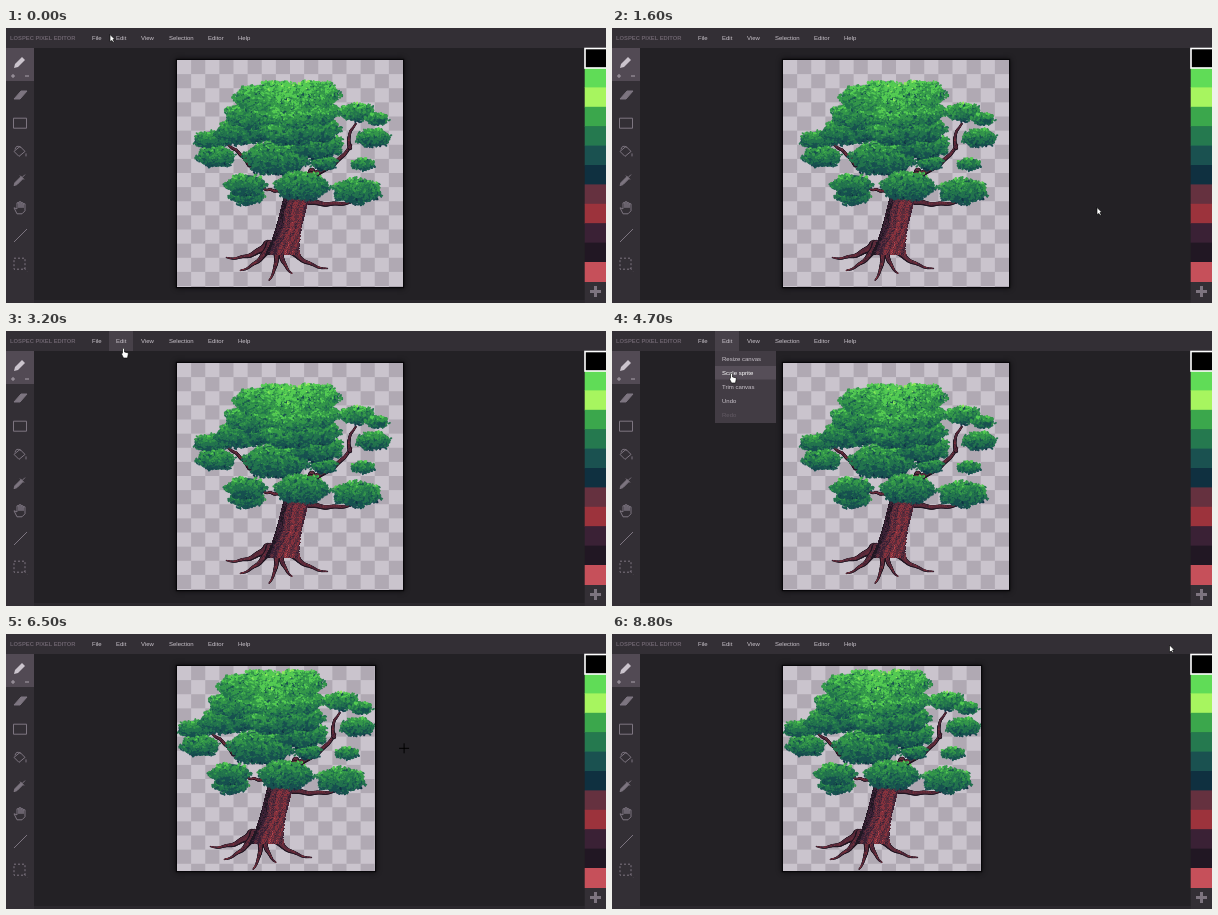
An HTML page with a canvas that plays this animation: 600x275 px, repeating every 8.9 s.

```html
<!DOCTYPE html>
<html lang="en">
<head>
<meta charset="utf-8">
<title>Pixel editor: trim canvas</title>
<style>
html, body { margin: 0; width: 100%; height: 100%; overflow: hidden; background: #232125; }
#stage { position: absolute; left: 0; top: 0; width: 600px; height: 275px; overflow: hidden; }
svg { position: absolute; left: 0; top: 0; }
canvas { position: absolute; left: 171px; top: 32px; box-shadow: 0 0 1px 1px #08070a, 0 0 5px 1px #0b0a0c; }
text { font: 6px "Liberation Sans", Arial, sans-serif; fill: #c9c3cb; }
.title { font-weight: bold; font-size: 5.8px; fill: #6b626d; }
.disabled { fill: #625a64; }
.hover { fill: #fff; }
.icon { fill: none; stroke: #7d7580; stroke-linejoin: round; }
.icon.solid { fill: #7d7580; }
.pointer { fill: #fff; stroke: #000; stroke-width: .6; }
</style>
</head>
<body>
<div id="stage">
  <canvas id="sprite"></canvas>
  <svg id="ui" width="600" height="275" viewBox="0 0 600 275"></svg>
</div>
<script>
const LOOP = 8900, STEP = 100;
const HOVER_EDIT = 3100, MENU_OPEN = 4100, TRIM = 5300;
const ROW_TOP = 21, ROW = 14;
const $ = id => document.getElementById(id);

// ---------- interface ----------
const rect = (x, y, w, h, fill, more = '') =>
  `<rect x="${x}" y="${y}" width="${w}" height="${h}" fill="${fill}" ${more}/>`;
const label = (x, y, text, cls = '') => `<text x="${x}" y="${y}" class="${cls}">${text}</text>`;

const menus = { File: 86, Edit: 110, View: 135, Selection: 163, Editor: 202, Help: 232 };
const editItems = ['Resize canvas', 'Scale sprite', 'Trim canvas', 'Undo', 'Redo'];
const swatches = ['#60dc57', '#a7f55f', '#3ba74c', '#25794f', '#1a5150', '#0f3040',
                  '#65313f', '#9c333c', '#3a2135', '#211723', '#c6505a'];

// Each icon is drawn around its own centre.
const tools = {
  eraser: 'M-6 4L1-4H7L0 4Z',
  rectangle: 'M-6.5-5h13v10h-13z',
  bucket: 'M-6 0L0-5 5 0-1 5ZM-5-2Q-4-7 1-4M6 2v3',
  eyedropper: 'M-6 6L-5 3 1-3 3-1-3 5ZM0-4L4 0M2-2L5-5',
  hand: 'M-3 6L-6 0l3 1V-5h2V0-6h2V0-5h2V0-4h2V3L2 6Z',
  line: 'M-6 6L7-7',
  select: 'M-6-6H5V5H-6ZM4 4l3 3'
};
const filled = ['eraser', 'eyedropper'];

function toolIcon(name, i) {
  const dash = name === 'select' ? 'stroke-dasharray="2"' : '';
  return `<path class="icon ${filled.includes(name) ? 'solid' : ''}" d="${tools[name]}" ${dash}
    transform="translate(14 ${67 + i * 28.2})"/>`;
}

$('ui').innerHTML =
  rect(0, 0, 600, 20, '#332f35') + rect(0, 20, 28, 255, '#332f35') +
  rect(28, 272, 551, 3, '#2b282d') + rect(0, 20, 28, 33, '#524a54') +
  rect(103, 0, 24, 20, '#474149', 'id="tab"') +
  label(4, 12.2, 'LOSPEC PIXEL EDITOR', 'title') +
  Object.entries(menus).map(([name, x]) => label(x, 12, name)).join('') +
  '<path d="M8 40l1-4 7-7 3 3-7 7z" fill="#cbc4cd"/>' +
  '<path d="M5 48h4m-2-2v4M19 48h4" stroke="#a9a1ab"/>' +
  Object.keys(tools).map(toolIcon).join('') +
  swatches.map((color, i) => rect(578.7, 40 + i * 19.4, 22, 20, color)).join('') +
  rect(579, 20.5, 22, 19.5, '#000', 'stroke="#fff" stroke-width="1.6"') +
  rect(578.7, 254, 22, 21, '#332f35') +
  '<path d="M584 263.5h11m-5.5-5.5v11" stroke="#7d747f" stroke-width="3"/>' +
  `<g id="menu">${rect(103, 20, 61, 72, '#423c44')}${rect(103, 0, 61, 13.5, '#564e58', 'id="row"')}` +
  editItems.map((s, i) => label(110, 30 + i * ROW, s, s === 'Redo' ? 'disabled' : 'item')).join('') +
  `</g><g id="cursor">
    <path id="arrow" class="pointer" d="M0 0V7L2 6 3 8 4 7 3 5H5Z"/>
    <path id="hand" class="pointer" d="M-1 1Q0-1 1 1V4L5 5 4 10H0L-2 6-1 5Z"/>
    <path id="cross" d="M-5 0H5M0-5V5" stroke="#000"/>
  </g>`;

// ---------- tree ----------
let seed = 7;
const rnd = () => (seed = (seed * 16807) % 2147483647) / 2147483647;
const jitter = size => (rnd() - .5) * size;
const lerp = (a, b, k) => a + (b - a) * k;
const pick = (colors, v) => colors[Math.max(0, Math.min(colors.length - 1, Math.floor(v)))];
const greens = ['#0f3143', '#185150', '#24754e', '#35984b', '#55cc53', '#90ec5c'];
const barks = ['#211723', '#3a2135', '#5c2c3b', '#87323d', '#b2464f'];

const FULL = { w: 226, h: 227, dx: 0, dy: 0 };
const TRIMMED = { w: 198, h: 205, dx: -16, dy: -17 };
const tree = document.createElement('canvas');
tree.width = FULL.w;
tree.height = FULL.h;
const ink = tree.getContext('2d');
ink.translate(-171, -32);

function blob(x, y, rx, ry, color, angle = 0) {
  ink.fillStyle = color;
  ink.beginPath();
  ink.ellipse(x, y, rx, ry, angle, 0, 7);
  ink.fill();
}

// A bent, tapering stroke with a dark rim and speckled light on top.
function limb(x0, y0, x1, y1, width, bend, taper = .4) {
  const dx = x1 - x0, dy = y1 - y0;
  for (const layer of ['rim', 'wood', 'light'])
    for (let k = 0; k <= 1; k += .015) {
      const arc = 2 * k * (1 - k) * bend;
      const x = x0 + dx * k - dy * arc, y = y0 + dy * k + dx * arc + Math.sin(k * 17) * .5;
      const r = width / 2 * lerp(1, taper, Math.sqrt(k));
      if (layer === 'rim') blob(x, y, r + .2, r + .2, barks[0]);
      else if (layer === 'wood') blob(x, y - r * .2, r * .7, r * .7, barks[2]);
      else blob(x + jitter(r), y - r * rnd() * .7, .5, .5, pick(barks, 1 + rnd() * 3));
    }
}

function trunk() {
  for (let y = 160; y < 227; y++) {
    const k = (y - 168) / 58;
    const mid = 290 - 14 * k, half = 12.5 + 5 * k ** 4;
    for (let u = -half; u <= half; u++) {
      const v = u / half;
      const grain = .5 * Math.sin(u * .9 + Math.sin(y * .15) * 2 + y * .1);
      ink.fillStyle = pick(barks, 3 - 1.5 * (v - .3) ** 2 + grain + jitter(1.5));
      ink.fillRect(Math.round(mid + u), y, 1, 1);
    }
  }
}

function roots() {
  const tips = [[220, 230], [234, 243], [322, 241], [286, 246], [263, 253]];
  for (const [x, y] of tips) {
    const start = lerp(271, x, .18);
    limb(start, 217, x, y, 10, .2 * Math.sign(x - start), .1);
  }
}

// Leaves hang like scales: drawn from the bottom up, brighter towards the crown.
function clump(cx, cy, rx) {
  const ry = rx * .53;
  blob(cx, cy, rx * .9, ry * .9, greens[1]);
  const leaves = Array.from({ length: rx * ry * 1.5 }, () => {
    const a = rnd() * Math.PI * 2;
    const r = Math.sqrt(rnd()) * (.98 + .08 * Math.sin(a * 6 + cx));
    return [r * Math.cos(a), r * Math.sin(a)];
  }).sort((p, q) => q[1] - p[1]);
  for (const [u, v] of leaves) {
    const x = cx + u * rx, y = cy + v * ry;
    const glow = 1.7 * Math.exp(-(((x - 285) / 55) ** 2) - ((y - 73) / 26) ** 2);
    const bunch = .4 * Math.sin(x * .5 + Math.sin(y * .4) * 2) * Math.sin(y * .55 + x * .2);
    const tone = 2.6 + glow - (1.4 - .4 * glow) * v + bunch + jitter(1.2);
    blob(x, y, 1.6, 1, pick(greens, tone), rnd() * Math.PI);
  }
}

function crown() {
  for (let row = 0; row < 3; row++)
    for (let col = 0; col < 4; col++)
      clump(lerp(235 + 9 * row, 309, col / 3), 102 - 17 * row + 2 * Math.cos(col * 3), 26);
}

limb(288, 176, 306, 143, 15, .05);
limb(304, 147, 345, 117, 7, .2);
limb(344, 120, 350, 96, 4, -.3);
limb(296, 172, 346, 174, 7, .12);
limb(244, 137, 222, 117, 5, .1);
limb(278, 164, 257, 161, 4, 0);
roots();
trunk();
[[351, 84, 18], [371, 91, 12], [367, 110, 18], [205, 112, 18], [210, 129, 20],
 [357, 136, 12], [318, 135, 14], [271, 130, 34], [312, 117, 26],
 [241, 168, 18], [240, 157, 21], [296, 158, 28], [351, 163, 25]].forEach(c => clump(...c));
crown();

function drawSprite({ w, h, dx, dy }) {
  const sprite = $('sprite'), cell = FULL.w / 16;
  sprite.width = w;
  sprite.height = h;
  const c = sprite.getContext('2d');
  c.fillStyle = '#cac4cd';
  c.fillRect(0, 0, w, h);
  c.fillStyle = '#b0a9b3';
  for (let i = 0; i < 16; i++)
    for (let j = 1 - i % 2; j < 17; j += 2) c.fillRect(i * cell, j * cell, cell, cell);
  c.drawImage(tree, dx, dy);
}

// ---------- motion ----------
const moves = [
  { from: 1000, to: 1500, x: 485, y: 179.5 },
  { from: 2700, to: HOVER_EDIT, x: 117.5, y: 17 },
  { from: 4200, to: 4600, x: 119.5, y: 42 },
  { from: 4900, to: 5200, x: 123.5, y: 59.5 },
  { from: 5900, to: 6700, x: 449, y: 124.5 },
  { from: 8000, to: 8800, x: 557.5, y: 11 }];

function pointerAt(t) {
  let x = 104, y = 6.5;
  for (const m of moves) {
    const k = Math.max(0, Math.min(1, (t - m.from) / (m.to - m.from)));
    const ease = k * k * (3 - 2 * k);
    x = lerp(x, m.x, ease);
    y = lerp(y, m.y, ease);
  }
  return [x, y];
}

const show = (id, on) => { $(id).style.display = on ? '' : 'none'; };
let shownSize, lastTime;

function render(t) {
  const [x, y] = pointerAt(t);
  const open = t >= MENU_OPEN && t < TRIM;
  const kind = t >= HOVER_EDIT && t < TRIM ? 'hand' : t >= TRIM && y > 20 ? 'cross' : 'arrow';
  const size = t < TRIM ? FULL : TRIMMED;
  if (size !== shownSize) drawSprite(shownSize = size);

  const hover = Math.floor((y - ROW_TOP) / ROW);
  show('tab', kind === 'hand');
  show('menu', open);
  show('row', hover >= 0);
  $('row').setAttribute('y', ROW_TOP + hover * ROW);
  document.querySelectorAll('.item').forEach((el, i) => el.classList.toggle('hover', i === hover));

  ['arrow', 'hand', 'cross'].forEach(id => show(id, id === kind));
  $('cursor').setAttribute('transform', `translate(${x.toFixed(1)} ${y.toFixed(1)})`);
}

function tick() {
  const t = Math.floor(performance.now() % LOOP / STEP) * STEP;
  if (t !== lastTime) render(lastTime = t);
  requestAnimationFrame(tick);
}
tick();
</script>
</body>
</html>
```
